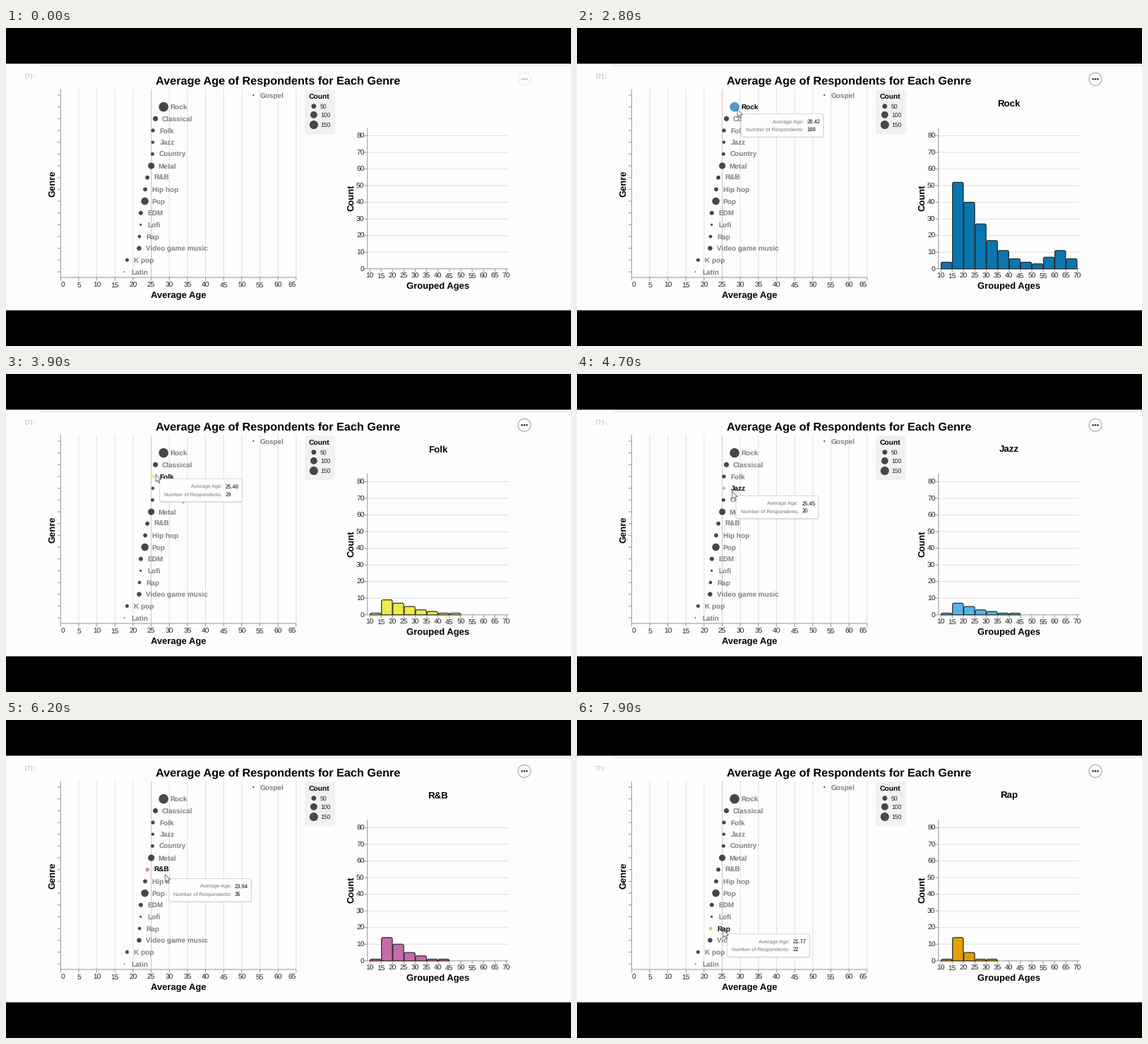
A matplotlib script for the animation above (8000 ms loop, 800x450 px).

```python
import numpy as np
import matplotlib.pyplot as plt
from matplotlib.animation import FuncAnimation
from matplotlib.patches import Circle, FancyBboxPatch, PathPatch, Polygon, Rectangle
from matplotlib.path import Path

plt.rcParams["text.hinting"] = "none"

W, H = 800, 450
FRAMES, STEP = 80, 100
PT = 0.72  # points per pixel at 100 dpi

SANS = "Liberation Sans"
DOT = "#474747"
AXIS = "#959595"
GRID = "#dedede"
GREEN, BLUE, SKY, YELLOW = "#1aa574", "#0a76b0", "#56b4e9", "#efe84a"
GREY, PINK, RED, ORANGE = "#8c8c8c", "#c56ca8", "#d55e00", "#dfa00c"

# name, mean age, respondents, colour
GENRES = [
    ("Gospel", 53.20, 5, GREEN),
    ("Rock", 28.42, 188, BLUE),
    ("Classical", 26.17, 53, SKY),
    ("Folk", 25.48, 29, YELLOW),
    ("Jazz", 25.45, 20, SKY),
    ("Country", 25.36, 25, GREY),
    ("Metal", 25.02, 86, PINK),
    ("R&B", 23.94, 35, PINK),
    ("Hip hop", 23.34, 35, RED),
    ("Pop", 23.25, 114, BLUE),
    ("EDM", 22.14, 37, GREEN),
    ("Lofi", 22.10, 10, GREY),
    ("Rap", 21.77, 22, ORANGE),
    ("Video game music", 21.66, 44, ORANGE),
    ("K pop", 18.35, 26, YELLOW),
    ("Latin", 17.60, 3, RED),
]

# pointer path: ms, x, y
PATH = np.array([
    (800, 796, 296), (1600, 425, 120), (1900, 302, 111), (2300, 228, 113),
    (2800, 227, 115), (3900, 212, 142), (5500, 227.5, 190),
    (6900, 223, 247), (7900, 207, 297),
])
ENTER = PATH[0, 0]
ARROW = np.array([(0, 0), (0, 10.6), (2.4, 8.4), (4.0, 12.2),
                  (5.7, 11.5), (4.1, 7.8), (7.4, 7.6)])

PLOT_L, PLOT_R, PLOT_T, PLOT_B = 77.3, 410.8, 86.5, 353
HIST_L, HIST_R, HIST_T, HIST_B = 511.8, 711.5, 141, 340.8


def age_x(age):
    return PLOT_L + age * (PLOT_R - PLOT_L) / 65


def row_y(i):
    return 95 + i * 16.67


def bin_x(i):
    return 515.2 + 16.1 * i


def count_y(n):
    return HIST_B - 2.355 * n


def radius(n):
    return 6.75 * np.sqrt(n / 188)


def histogram(age, count):
    """Five-year bins from age 10: a young peak that widens with the mean age,
    plus a bump in the sixties for older audiences."""
    i = np.arange(12)
    spread = np.clip(1 + 0.45 * (age - 21.77), 0.8, 2.8)
    young = np.where(i == 0, 0.08, np.exp(-(np.maximum(i - 1, 0) / spread) ** 1.3))
    old = np.exp(-(i - 10) ** 2 / 2)
    share = np.clip(0.04 * (age - 25.2), 0, 0.8)
    exact = count * ((1 - share) * young / young.sum() + share * old / old.sum())
    bins = np.floor(exact).astype(int)
    rest = count - bins.sum()
    bins[np.argsort(bins - exact)[:rest]] += 1
    return bins


fig = plt.figure(figsize=(8, 4.5), dpi=100, facecolor="#fdfdfd")
ax = fig.add_axes([0, 0, 1, 1])
ax.set_xlim(0, W)
ax.set_ylim(H, 0)
ax.axis("off")


def text(x, y, s, size, color="black", bold=False, ha="left", z=4, font=SANS):
    """Text whose capitals are centred on y."""
    return ax.text(x, y + 0.36 * size, s, fontsize=size * PT, color=color,
                   weight="bold" if bold else "normal", ha=ha, va="baseline",
                   family=font, zorder=z)


def turned(x, y, s, size):
    ax.text(x, y, s, fontsize=size * PT, weight="bold", rotation=90,
            ha="center", va="center", family=SANS, zorder=4)


def line(x0, y0, x1, y1, color, width=1.0, z=1):
    return ax.plot([x0, x1], [y0, y1], color=color, lw=width * PT, zorder=z,
                   solid_capstyle="butt", snap=False)[0]


def put(patch):
    patch.set_snap(False)
    return ax.add_patch(patch)


def rounded(x, y, w, h, r, z, **style):
    return put(FancyBboxPatch((x, y), w, h, zorder=z,
                              boxstyle=f"round,pad=0,rounding_size={r}", **style))


def draw_page():
    put(Rectangle((0, 0), W, 50.5, color="black", lw=0))
    put(Rectangle((0, 399.5), W, 50.5, color="black", lw=0))
    line(48, 53.5, W, 53.5, "#e4e4e4")
    text(25.5, 68, "[7]:", 7.7, "#a8a8a8", font="DejaVu Sans Mono")
    text(385.5, 74, "Average Age of Respondents for Each Genre", 16.2,
         bold=True, ha="center")


def draw_scatter_axes():
    for age in range(5, 70, 5):
        if age != 25:
            line(age_x(age), PLOT_T, age_x(age), PLOT_B, GRID)
    for age in range(0, 70, 5):
        x = age_x(age)
        line(x, PLOT_B, x, PLOT_B + 4.5, AXIS)
        ha = {0: "left", 65: "right"}.get(age, "center")
        text(x, 363, str(age), 10.2, "#222222", ha=ha)
    for i in range(len(GENRES)):
        line(PLOT_L - 4.5, row_y(i), PLOT_L, row_y(i), AXIS)
    line(PLOT_L, PLOT_T, PLOT_L, PLOT_B, AXIS)
    line(PLOT_L, PLOT_B, PLOT_R, PLOT_B, AXIS)
    text(244, 377.3, "Average Age", 13, bold=True, ha="center")
    turned(66, 220, "Genre", 13)


def draw_legend():
    rounded(423, 87, 43, 63.5, 4, 1, fc="#f1f1f1", ec="none")
    text(429, 97.5, "Count", 10.2, bold=True)
    for n, y in ((50, 110.7), (100, 122.8), (150, 137)):
        put(Circle((435.8, y), radius(n), fc=DOT, lw=0, zorder=3))
        text(445, y, str(n), 8.6, "#222222")


def draw_hist_axes():
    for n in range(0, 90, 10):
        y = count_y(n)
        if n:
            line(HIST_L, y, HIST_R, y, GRID)
        line(HIST_L - 4.5, y, HIST_L, y, AXIS)
        text(507.5, y, str(n), 10.2, "#222222", ha="right")
    for i in range(13):
        x = bin_x(i)
        line(x, HIST_B, x, HIST_B + 4.5, AXIS)
        text(x, 350, str(10 + 5 * i), 10.2, "#222222", ha="center")
    line(HIST_L, HIST_T, HIST_L, HIST_B, AXIS)
    line(HIST_L, HIST_B, HIST_R, HIST_B, AXIS)
    text(612, 364.5, "Grouped Ages", 13, bold=True, ha="center")
    turned(488.5, 240, "Count", 13)


def draw_points():
    dots, labels = [], []
    for i, (name, age, count, _) in enumerate(GENRES):
        x, y = age_x(age), row_y(i)
        dots.append(put(Circle((x, y), radius(count), lw=0, zorder=3)))
        labels.append(text(x + 9.5, y, name, 10, bold=True))
    return dots, labels


def draw_menu():
    ring = put(Circle((734, 72.3), 9, fc="#fdfdfd", lw=0.8, zorder=3))
    return ring, [put(Circle((734 + d, 72.3), 1.25, lw=0, zorder=4))
                  for d in (-3.4, 0, 3.4)]


draw_page()
draw_scatter_axes()
draw_legend()
draw_hist_axes()
rule = line(age_x(25), PLOT_T, age_x(25), PLOT_B, "#cccccc")
dots, labels = draw_points()
ring, menu_dots = draw_menu()
live = []


def pointer(t):
    return (np.interp(t, PATH[:, 0], PATH[:, 1]),
            np.interp(t, PATH[:, 0], PATH[:, 2]))


def nearest(x, y):
    """Index of the point closest to the pointer, or None outside the plot."""
    if not (PLOT_L < x < PLOT_R and PLOT_T < y < PLOT_B):
        return None
    gaps = [np.hypot(x - age_x(g[1]), y - row_y(i)) for i, g in enumerate(GENRES)]
    return int(np.argmin(gaps))


def bar(i, n, color):
    x0, x1, top = bin_x(i) + 0.4, bin_x(i + 1) - 0.4, count_y(n)
    r = min(2.2, HIST_B - top)
    verts = [(x0, HIST_B), (x0, top + r), (x0, top), (x0 + r, top), (x1 - r, top),
             (x1, top), (x1, top + r), (x1, HIST_B), (x0, HIST_B)]
    codes = [Path.MOVETO, Path.LINETO, Path.CURVE3, Path.CURVE3, Path.LINETO,
             Path.CURVE3, Path.CURVE3, Path.LINETO, Path.CLOSEPOLY]
    return put(PathPatch(Path(verts, codes), fc=color, ec="#222222",
                         lw=1.15 * PT, zorder=3))


def tooltip(x, y, age, count):
    parts = [rounded(x + 1, y + 1.2, 116.5, 32.5, 2, 6, fc="black", ec="none",
                     alpha=0.10),
             rounded(x, y, 116.5, 32.5, 2, 7, fc="#fefefe", ec="#cfcfcf", lw=0.6)]
    rows = (("Average Age:", f"{age:.2f}"), ("Number of Respondents:", str(count)))
    for k, (key, value) in enumerate(rows):
        ty = y + 10.8 + 10.7 * k
        parts.append(text(x + 88.7, ty, key, 7.4, "#747474", ha="right", z=8))
        parts.append(text(x + 93.3, ty, value, 7.6, "black", z=8))
    return parts


def update(k):
    t = k * STEP
    while live:
        live.pop().remove()

    glow = np.clip((t - 700) / 400, 0, 1)
    ring.set_edgecolor(str(0.91 - 0.26 * glow))
    for d in menu_dots:
        d.set_facecolor(str(0.74 - 0.62 * glow))
    rule.set_color("#dcb8ba" if t < 2900 else "#cacaca")

    x, y = pointer(t)
    chosen = nearest(x, y) if t >= ENTER else None
    for i, (dot, label) in enumerate(zip(dots, labels)):
        on = i == chosen
        dot.set_facecolor(GENRES[i][3] if on else DOT)
        dot.set_alpha(0.72 if on else None)
        label.set_color("black" if on else "#808080")

    if chosen is not None:
        name, age, count, color = GENRES[chosen]
        live.append(text(611.5, 105.7, name, 13.3, bold=True, ha="center"))
        live.extend(bar(i, n, color)
                    for i, n in enumerate(histogram(age, count)) if n)
        # the tooltip trails the pointer slightly
        tx, ty = pointer(t - 18)
        live.extend(tooltip(tx + 5.4, ty + 6.7, age, count))
    if t >= ENTER:
        live.append(put(Polygon(ARROW + (x, y), fc="white", ec="#4a4a4a",
                                lw=0.75 * PT, zorder=9)))
    return []


anim = FuncAnimation(fig, update, frames=FRAMES, interval=STEP,
                     init_func=lambda: update(0), repeat=True, repeat_delay=0)
plt.show()
```
